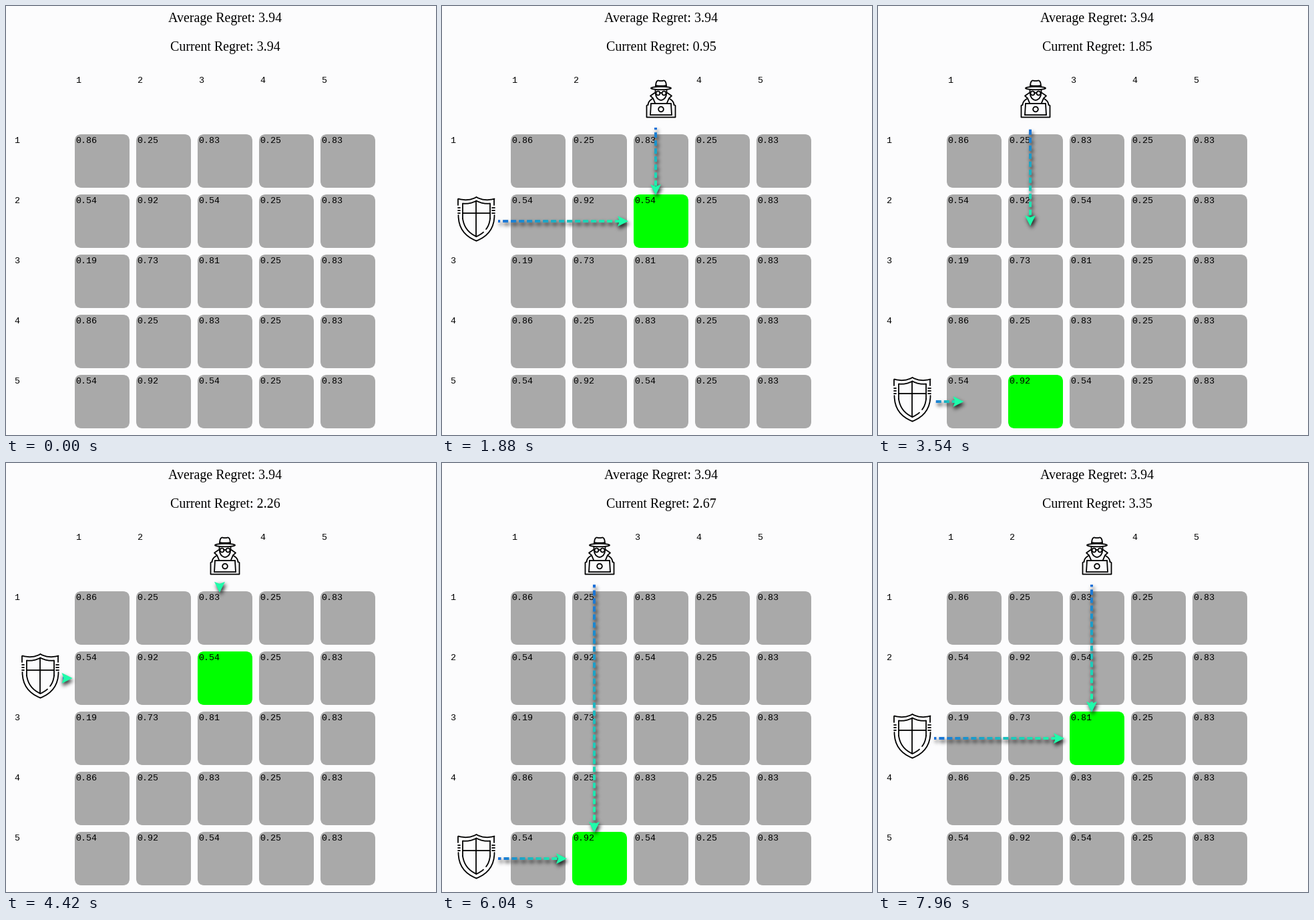
A matplotlib script that plays this animation: 644 by 642 pixels, repeating every 8 s.

```python
import numpy as np
import matplotlib.pyplot as plt
from matplotlib.animation import FuncAnimation
from matplotlib.patches import Circle, Ellipse, FancyBboxPatch, PathPatch, Polygon
from matplotlib.path import Path
from matplotlib.transforms import Affine2D

W, H, DPI = 644, 642, 100
FRAMES, STEP = 200, 40
PX = 72 / DPI
BACK, CELL, HIT = "#fcfcfd", "#a9a9a9", "#00ff00"
TAIL, TIP = np.array([0.11, 0.44, 0.85]), np.array([0.12, 0.99, 0.667])

PAYOFF = [
    [0.86, 0.25, 0.83, 0.25, 0.83],
    [0.54, 0.92, 0.54, 0.25, 0.83],
    [0.19, 0.73, 0.81, 0.25, 0.83],
    [0.86, 0.25, 0.83, 0.25, 0.83],
    [0.54, 0.92, 0.54, 0.25, 0.83],
]
# start (ms), row, column, regret
ROUNDS = [
    (370, 4, 4, 0.48), (1310, 2, 3, 0.95), (2287, 3, 5, 1.41), (3315, 5, 2, 1.85),
    (4330, 2, 3, 2.26), (5350, 5, 2, 2.67), (6344, 2, 3, 3.02), (7366, 3, 3, 3.35),
]

fig = plt.figure(figsize=(W / DPI, H / DPI), dpi=DPI, facecolor=BACK)
ax = fig.add_axes([0, 0, 1, 1])
ax.set(xlim=(0, W), ylim=(H, 0))
ax.axis("off")


def left(col):
    return 103 + 92 * (col - 1)


def top(row):
    return 192 + 90 * (row - 1)


def mono(x, y, text):
    return ax.text(x, y, text, family="Liberation Mono", size=13.33 * PX, va="baseline", zorder=3)


def heading(y, text):
    return ax.text(328, y, text, family="Liberation Serif", size=20 * PX,
                   ha="center", va="baseline", zorder=3)


class Icon:
    """Line drawing that is moved as a whole."""

    def __init__(self):
        self.move = Affine2D()
        self.parts = []

    def add(self, patch):
        patch.set(transform=self.move + ax.transData, zorder=4, facecolor="none",
                  edgecolor="black", linewidth=1.8 * PX, capstyle="round", joinstyle="round")
        ax.add_artist(patch)
        self.parts.append(patch)

    def line(self, *pts):
        self.add(PathPatch(Path(pts)))

    def curve(self, *pts):
        self.add(PathPatch(Path(pts, [Path.MOVETO] + [Path.CURVE3] * (len(pts) - 1))))

    def place(self, x, y):
        self.move.clear().translate(x, y)

    def show(self, on):
        for part in self.parts:
            part.set_visible(on)


def make_shield():
    icon = Icon()
    for s in (-1, 1):
        icon.curve((0, 4), (s * 12, 11), (s * 27, 6.5))
        icon.line((s * 27, 6.5), (s * 27, 16))
        icon.curve((s * 27, 31), (s * 27, 59), (0, 69.5))
        icon.curve((0, 9.5), (s * 10, 15), (s * 20.5, 13.5))
        icon.line((s * 20.5, 13.5), (s * 20.5, 36))
        for y in (20, 24, 28):
            icon.line((s * 24, y), (s * 27.5, y))
    icon.curve((-20.5, 36), (-18, 55), (0, 63))
    icon.curve((20.5, 36), (19.5, 46), (14.5, 52))
    icon.curve((10.5, 56.5), (6, 60.5), (0, 63))
    icon.line((0, 9.5), (0, 63))
    icon.line((-20.5, 28), (20.5, 28))
    return icon


def make_agent():
    icon = Icon()
    icon.curve((-8, 121), (-8, 111.5), (-4, 111.5), (0, 113), (4, 111.5), (8, 111.5), (8, 121))
    icon.curve((-8, 119), (0, 120.5), (8, 119))
    icon.add(Ellipse((0, 123), 30, 4.5))
    icon.curve((-8.5, 126), (-9, 140), (0, 141), (9, 140), (8.5, 126))
    icon.line((-1.5, 130), (1.5, 130))
    for s in (-1, 1):
        icon.add(Circle((s * 4.5, 130.5), 3))
        icon.line((s * 9.5, 130), (s * 16, 134.5), (s * 12, 138), (s * 9, 145))
        icon.curve((s * 13, 139), (s * 19, 142), (s * 19.5, 148))
        icon.line((s * 15, 146), (s * 16, 163))
    icon.line((-15, 146), (15, 146))
    icon.line((-19.5, 148), (-21.5, 149), (-21.5, 166.5), (21.5, 166.5), (21.5, 149), (19.5, 148))
    icon.line((-16, 163), (16, 163))
    icon.add(Circle((0, 154.5), 3.8))
    return icon


def ease(t):
    """Cubic bezier (0.58, 0, 0.42, 1)."""
    s = np.linspace(0, 1, 400)
    x = 3 * (1 - s) ** 2 * s * 0.58 + 3 * (1 - s) * s ** 2 * 0.42 + s ** 3
    return float(np.interp(t, x, 3 * s ** 2 - 2 * s ** 3))


KERNEL = np.exp(-np.arange(-9, 10) ** 2 / 18)
KERNEL /= KERNEL.sum()


def blur(a):
    for _ in range(2):
        padded = np.pad(a, ((9, 9), (0, 0)))
        a = sum(k * padded[i:i + len(a)] for i, k in enumerate(KERNEL)).T
    return a


class Arrow:
    """Dashed gradient line with a head and a soft shadow, drawn from its start."""

    PAD = 22

    def __init__(self, vertical):
        self.vertical = vertical
        self.shadow, self.stroke = (
            ax.imshow(np.zeros((1, 1, 4)), aspect="auto", interpolation="nearest", zorder=z)
            for z in (5, 6))
        self.head = ax.add_patch(Polygon([(0, 0)] * 3, facecolor=TIP, linewidth=0, zorder=7))

    def show(self, on):
        for part in (self.shadow, self.stroke, self.head):
            part.set_visible(on)

    def put(self, image, rgba, u0, v0, thick, dx=0, dy=0):
        length = rgba.shape[1]
        if self.vertical:
            rgba, box = rgba.transpose(1, 0, 2), (v0, v0 + thick, u0 + length, u0)
        else:
            box = (u0, u0 + length, v0 + thick, v0)
        image.set_data(rgba)
        image.set_extent((box[0] + dx, box[1] + dx, box[2] + dy, box[3] + dy))

    def draw(self, start, end, across, elapsed):
        length = (end - start) * ease(min(elapsed / 500, 1))
        size = int(np.ceil(length)) + 1
        fine = (np.arange(size * 8) + 0.5) / 8
        phase = elapsed % 1000 / 1000 * 12
        dash = ((fine - phase) % 12 < 8) & (fine < length)
        dash = dash.reshape(-1, 8).mean(axis=1)

        mix = np.clip((np.arange(size) + 0.5) / max(length, 1), 0, 1)[:, None]
        rgba = np.zeros((1, size, 4))
        rgba[0, :, :3] = TAIL + (TIP - TAIL) * mix
        rgba[0, :, 3] = dash
        self.put(self.stroke, rgba, start, across - 2, 4)

        p = self.PAD
        mask = np.zeros((2 * p, size + 2 * p))
        mask[p - 2:p + 2, p:p + size] = dash
        du = np.arange(size + 2 * p) + 0.5 - p - length
        dv = np.abs(np.arange(2 * p) + 0.5 - p)[:, None]
        mask[(np.abs(du) <= 8) & (dv <= (8 - du) / 2)] = 1
        shade = np.zeros(mask.shape + (4,))
        shade[..., 3] = 0.8 * blur(mask)
        self.put(self.shadow, shade, start - p, across - p, 2 * p, 2, 4)

        tip = start + length
        pts = [(tip + u, across + v) for u, v in ((-8, -8), (8, 0), (-8, 8), (-5, 0))]
        self.head.set_xy([(v, u) for u, v in pts] if self.vertical else pts)


heading(24, "Average Regret: 3.94")
current = heading(67, "")
col_labels = [mono(left(i) + 1, 115, str(i)) for i in range(1, 6)]
row_labels = [mono(12, top(i) + 13, str(i)) for i in range(1, 6)]
cells = {}
for r in range(1, 6):
    for c in range(1, 6):
        box = FancyBboxPatch((left(c), top(r)), 82, 80, linewidth=0, facecolor=CELL,
                             boxstyle="round,pad=0,rounding_size=10")
        cells[r, c] = ax.add_patch(box)
        mono(left(c) + 1, top(r) + 13, f"{PAYOFF[r - 1][c - 1]:.2f}")

shield, agent = make_shield(), make_agent()
across_arrow, down_arrow = Arrow(False), Arrow(True)
ax.set(xlim=(0, W), ylim=(H, 0))


def update(frame):
    now = (frame + 0.5) * STEP
    started = [r for r in ROUNDS if r[0] <= now]
    begin, row, col, regret = started[-1] if started else (0, 0, 0, 3.94)

    current.set_text(f"Current Regret: {regret:.2f}")
    for key, cell in cells.items():
        cell.set_facecolor(HIT if key == (row, col) else CELL)
    for i in range(5):
        col_labels[i].set_visible(i + 1 != col)
        row_labels[i].set_visible(i + 1 != row)
    for item in (shield, agent, across_arrow, down_arrow):
        item.show(bool(started))
    if started:
        shield.place(51.5, top(row))
        agent.place(left(col) + 41, 0)
        across_arrow.draw(84, left(col) - 16, top(row) + 40, now - begin)
        down_arrow.draw(182, top(row) - 7, left(col) + 33, now - begin)
    return []


anim = FuncAnimation(fig, update, frames=FRAMES, interval=STEP,
                     init_func=lambda: update(0), repeat=True, repeat_delay=0)
plt.show()
```
